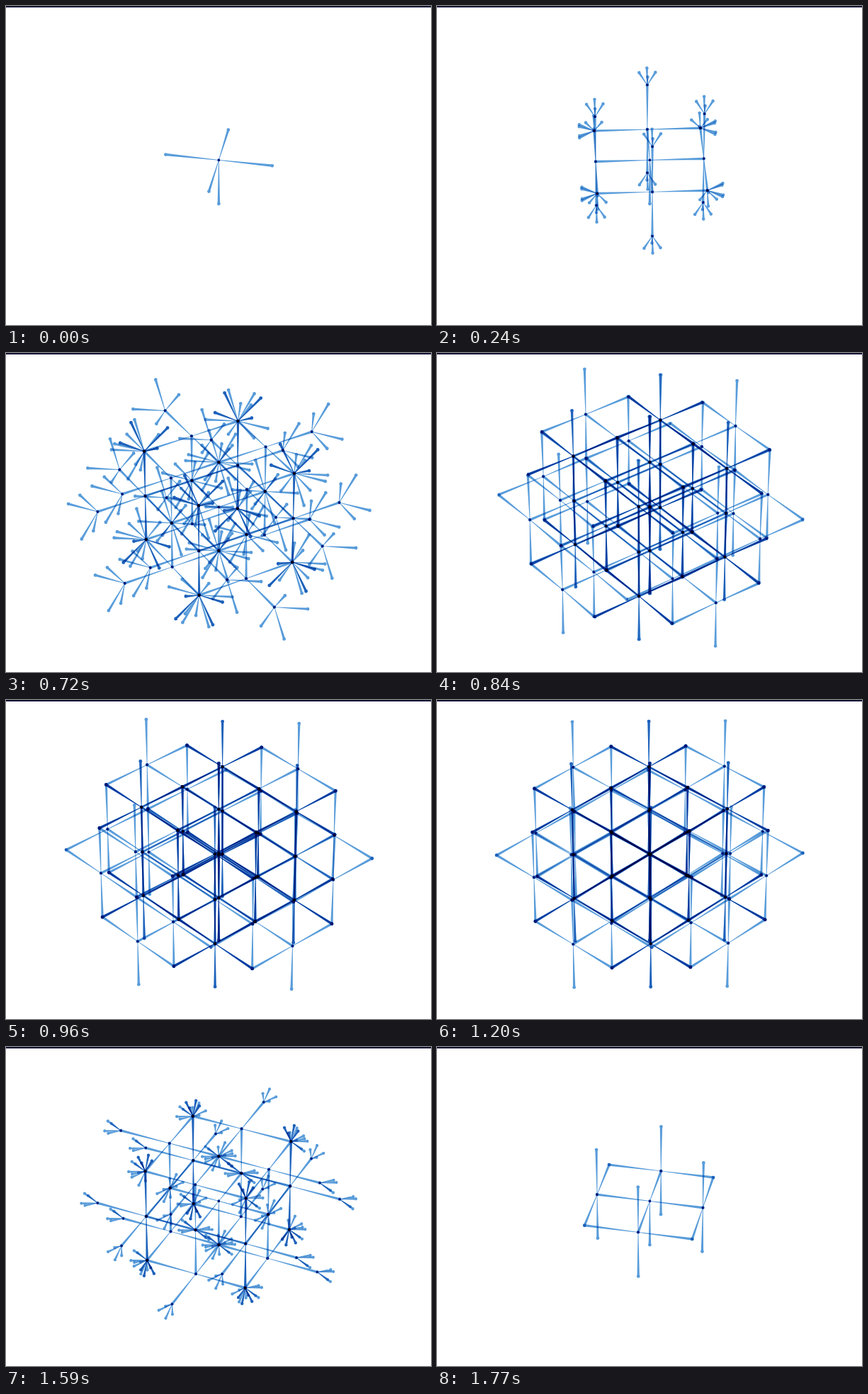
These frames come from a looping animation (600x450 px, 1.8 s). An HTML page with a canvas:

```html
<!DOCTYPE html>
<html>
<head>
<meta charset="utf-8">
<style>
html, body { margin: 0; width: 100%; height: 100%; overflow: hidden; background: #fff; }
canvas { display: block; }
</style>
</head>
<body>
<canvas id="stage" width="600" height="450"></canvas>
<script>
const ctx = document.getElementById('stage').getContext('2d');
const LOOP = 60, STEP = 30;              // steps per loop, ms per step
const UNIT = 76.4, CX = 300.4, CY = 217.4, DISTANCE = 3500;
const SIN_TILT = Math.sqrt(1 / 3), COS_TILT = Math.sqrt(2 / 3);
const AXES = [[1, 0, 0], [0, 1, 0], [0, 0, 1]];

// Turn of the lattice: [step, degrees], a quarter turn per loop.
const TURN = [[0, 10.3], [15, -13.7], [24, -30.3], [32, -42.2], [40, -45.7], [48, -55]];
// Level of the tree: [grow from, grow to, fold from, fold to]
const LEVELS = [[-2, -1, 61, 62], [0, 5, 61, 62], [5, 13, 55, 59], [18, 28.5, 49.5, 55]];

const smooth = (a, b, x) => {
  const u = Math.min(1, Math.max(0, (x - a) / (b - a)));
  return u * u * (3 - 2 * u);
};
const add = (a, b, k = 1) => a.map((v, i) => v + k * b[i]);

function knot(i) {
  const n = TURN.length, lap = Math.floor(i / n);
  const [s, deg] = TURN[i - lap * n];
  return [s + lap * LOOP, deg - lap * 90];
}

function slope(i) {
  const [s0, d0] = knot(i - 1), [s1, d1] = knot(i + 1);
  return (d1 - d0) / (s1 - s0);
}

function turnAt(step) {
  let i = 0;
  while (knot(i + 1)[0] <= step) i++;
  const [s0, d0] = knot(i), [s1, d1] = knot(i + 1);
  const h = s1 - s0, u = (step - s0) / h, v = 1 - u;
  const deg = d0 * v * v * (1 + 2 * u) + d1 * u * u * (3 - 2 * u)
    + h * u * v * (slope(i) * v - slope(i + 1) * u);
  return deg * Math.PI / 180;
}

function project([x, y, z], turn) {
  const c = Math.cos(turn), s = Math.sin(turn);
  const side = UNIT * (x * c - z * s), front = UNIT * (x * s + z * c);
  const depth = front * COS_TILT + UNIT * y * SIN_TILT;
  const k = 1 / (1 - depth / DISTANCE);
  return [CX + side * k, CY + (front * SIN_TILT - UNIT * y * COS_TILT) * k];
}

// A needle: fine at its base, widening to a round tip.
function arm(from, to, turn, size) {
  const [x0, y0] = project(from, turn), [x1, y1] = project(to, turn);
  const a = Math.atan2(y1 - y0, x1 - x0);
  const nx = -Math.sin(a), ny = Math.cos(a);
  const thin = 0.35, wide = 1.7 * size;
  ctx.beginPath();
  ctx.moveTo(x0 - nx * thin, y0 - ny * thin);
  ctx.lineTo(x1 - nx * wide, y1 - ny * wide);
  ctx.lineTo(x1 + nx * wide, y1 + ny * wide);
  ctx.lineTo(x0 + nx * thin, y0 + ny * thin);
  ctx.closePath();
  for (const [x, y, r] of [[x0, y0, 1.8], [x1, y1, 2.4]]) {
    ctx.moveTo(x + r * size, y);
    ctx.arc(x, y, r * size, 0, 2 * Math.PI);
  }
  ctx.fill();
}

function branch(pos, dir, level, open, turn) {
  const p = open[level];
  if (!p) return;
  const angle = p * Math.PI / 2;
  const lean = p * Math.cos(angle), spread = p * Math.sin(angle);
  AXES.forEach((axis, i) => {
    if (dir[i]) return;
    for (const sign of [-1, 1]) {
      const side = axis.map(v => v * sign);
      const tip = add(add(pos, dir, lean), side, spread);
      arm(pos, tip, turn, Math.min(1, 3 * p));
      if (p === 1 && level < 3) branch(tip, side, level + 1, open, turn);
    }
  });
}

function draw(now) {
  const step = Math.floor(now / STEP) % LOOP;
  const turn = turnAt(step);
  const open = LEVELS.map(([a, b, c, d]) => smooth(a, b, step) * (1 - smooth(c, d, step)));

  ctx.globalCompositeOperation = 'source-over';
  ctx.fillStyle = '#fff';
  ctx.fillRect(0, 0, 600, 450);
  ctx.fillStyle = '#000033';
  ctx.fillRect(0, 0, 600, 2);

  ctx.globalCompositeOperation = 'multiply';
  ctx.fillStyle = 'rgb(88,156,218)';
  arm([0, 0, 0], [0, -1, 0], turn, 1);
  branch([0, 0, 0], [0, 1, 0], 0, open, turn);
}

const start = performance.now();
function tick() {
  draw(performance.now() - start);
  requestAnimationFrame(tick);
}
tick();
</script>
</body>
</html>
```
